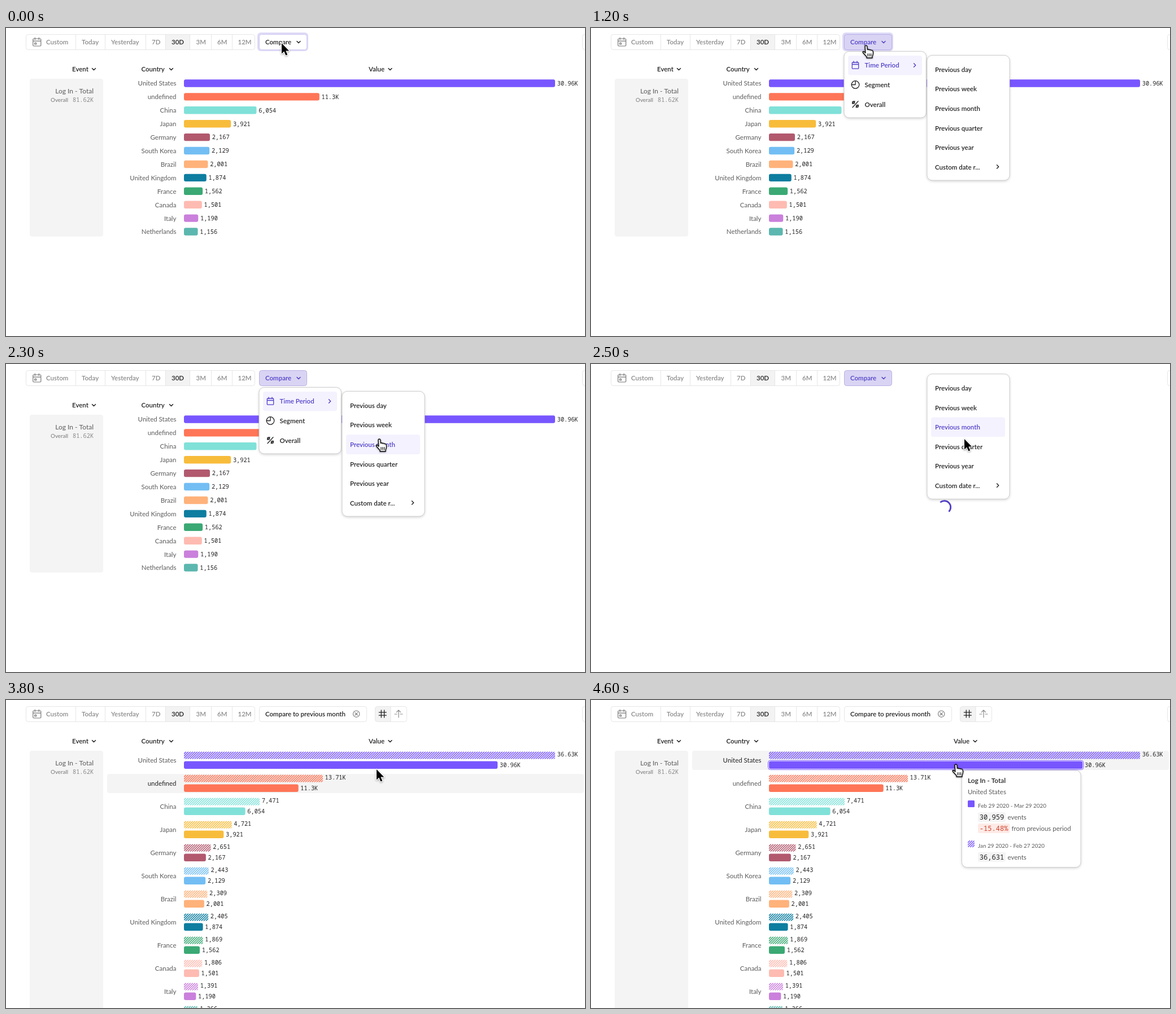
Write an HTML page with a canvas that moves like this. It is 1025 px wide and 546 px high and loops after 4700 ms.

```html
<!DOCTYPE html>
<html lang="en">
<head>
<meta charset="utf-8">
<title>Compare periods</title>
<style>
html, body { margin: 0; width: 100%; height: 100%; overflow: hidden; background: #fff; }
canvas { display: block; width: 1025px; height: 546px; }
</style>
</head>
<body>
<canvas id="stage"></canvas>
<script>
const W = 1025, H = 546, LOOP = 4700, STEP = 100;
const canvas = document.getElementById('stage');
const ctx = canvas.getContext('2d');
const dpr = window.devicePixelRatio || 1;
canvas.width = W * dpr;
canvas.height = H * dpr;

const SANS = 'Lato, "Open Sans", sans-serif';
const MONO = '"Noto Sans Mono", "DejaVu Sans Mono", monospace';
const INK = '#222', SOFT = '#5c5c5c', GREY = '#8a8a8a', LINE = '#e6e6e6';
const PURPLE = '#4f3fc8', TINT = '#f4f2fe', PANEL = '#f4f4f4';
const LEFT = 315, FULL = 657;

// name, colour, current value, previous value
const rows = [
  ['United States', '#7856ff', 30959, 36631],
  ['undefined', '#ff7557', 11300, 13710],
  ['China', '#80e1d9', 6054, 7471],
  ['Japan', '#f8bc3b', 3921, 4721],
  ['Germany', '#b2596e', 2167, 2651],
  ['South Korea', '#72bef4', 2129, 2443],
  ['Brazil', '#ffb27a', 2001, 2309],
  ['United Kingdom', '#0d7ea0', 1874, 2405],
  ['France', '#3ba974', 1562, 1869],
  ['Canada', '#febbb2', 1501, 1806],
  ['Italy', '#ca80dc', 1190, 1391],
  ['Netherlands', '#5bb7af', 1156, 1366]
];
const periods = ['Previous day', 'Previous week', 'Previous month',
  'Previous quarter', 'Previous year', 'Custom date r...'];

// time, x, y of the pointer's hot spot
const track = [
  [0, 488, 27], [600, 488, 27], [800, 487, 31], [1200, 487, 31],
  [1800, 667, 107], [2100, 661, 133], [3700, 661, 133],
  [3800, 656, 123], [4300, 646, 114], [LOOP, 646, 114]
];

const format = v => v >= 1e4 ? +(v / 1000).toFixed(2) + 'K' : v.toLocaleString('en-US');

function text(s, x, y, { color = INK, size = 11.5, weight = 400, align = 'left', face = SANS } = {}) {
  ctx.font = `${weight} ${size}px ${face}`;
  ctx.textAlign = align;
  ctx.fillStyle = color;
  ctx.fillText(s, x, y + size * 0.36);
}
const bold = (s, x, y, color = INK) => text(s, x, y, { color, weight: 600 });
const mono = (s, x, y, color = INK, size = 10.3) => text(s, x, y, { color, size, face: MONO });

function box(x, y, w, h, r, fill, stroke) {
  ctx.beginPath();
  ctx.roundRect(x, y, w, h, r);
  if (fill) { ctx.fillStyle = fill; ctx.fill(); }
  if (stroke) { ctx.strokeStyle = stroke; ctx.lineWidth = 1; ctx.stroke(); }
}

function path(d, x, y, stroke, width = 1.3, fill) {
  const p = new Path2D(d);
  ctx.save();
  ctx.translate(x, y);
  ctx.lineJoin = ctx.lineCap = 'round';
  if (fill) { ctx.fillStyle = fill; ctx.fill(p); }
  if (stroke) { ctx.strokeStyle = stroke; ctx.lineWidth = width; ctx.stroke(p); }
  ctx.restore();
}

function circle(x, y, r, color, width = 1.3) {
  ctx.beginPath();
  ctx.arc(x, y, r, 0, 7);
  ctx.strokeStyle = color;
  ctx.lineWidth = width;
  ctx.stroke();
}

const chevron = (x, y, color = INK) => path('M-3 -1.5L0 1.5L3 -1.5', x, y, color, 1.5);
const arrowRight = (x, y, color) => path('M-1.5 -3.2L1.7 0L-1.5 3.2', x, y, color, 1.4);

function card(x, y, w, h) {
  ctx.save();
  ctx.shadowColor = 'rgba(0,0,0,.2)';
  ctx.shadowBlur = 5 * dpr;
  ctx.shadowOffsetY = 1.5 * dpr;
  box(x, y, w, h, 9, '#fff');
  ctx.restore();
  box(x, y, w, h, 9, null, '#cfcfcf');
}

function hatch(x, y, w, h, color, r = 3) {
  ctx.save();
  ctx.beginPath();
  ctx.roundRect(x, y, w, h, r);
  ctx.clip();
  ctx.beginPath();
  for (let k = x - h; k < x + w + h; k += 4) {
    ctx.moveTo(k, y + h);
    ctx.lineTo(k + h, y);
  }
  ctx.strokeStyle = color;
  ctx.lineWidth = 1.5;
  ctx.stroke();
  ctx.restore();
}

function toolbar(t) {
  box(283, 12, 42, 26, 0, '#f3f3f3');
  box(35.5, 11.5, 405, 27, 4, null, LINE);
  for (const x of [123, 175, 247, 282, 325, 363, 400]) {
    ctx.fillStyle = LINE;
    ctx.fillRect(x, 12, 1, 26);
  }
  path('M-5.5 -6H5.5Q7 -6 7 -4.5V5.5Q7 7 5.5 7H-5.5Q-7 7 -7 5.5V-4.5Q-7 -6 -5.5 -6ZM-7 -1.8H7M-3.5 -8V-4.5M3.5 -8V-4.5M-4 1.3H-1.2V4H-4Z',
    54.8, 25, '#777', 1.2);
  const items = [['Custom', 71], ['Today', 134], ['Yesterday', 186], ['7D', 258],
    ['30D', 293], ['3M', 336.5], ['6M', 374], ['12M', 410.5]];
  for (const [s, x] of items) bold(s, x, 25, s === '30D' ? INK : GREY);
  box(1020.5, 11.5, 30, 27, 4, null, LINE);

  if (t >= 2800) {
    box(448.5, 11.5, 190, 27, 4, '#fff', LINE);
    bold('Compare to previous month', 459, 25);
    circle(620.2, 24.7, 5.7, '#777', 1.1);
    path('M-2.3 -2.3L2.3 2.3M2.3 -2.3L-2.3 2.3', 620.2, 24.7, '#777', 1.1);
    box(653, 12, 28, 26, [4, 0, 0, 4], '#f3f3f3');
    box(653.5, 11.5, 56, 27, 4, null, LINE);
    ctx.fillStyle = LINE;
    ctx.fillRect(680.5, 12, 1, 26);
    path('M-2.5 -6.5V6.5M2.8 -6.5V6.5M-6.5 -2.7H6.5M-6.5 2.7H6.5', 666.8, 24.5, INK, 1.3);
    path('M0 6.5V-6M-3.6 -2.8L0 -6.5L3.6 -2.8M-7 0.5H-3M3 0.5H7', 695, 24.5, GREY, 1.2);
    return;
  }
  const open = t >= 700;
  if (t < 2300) box(445, 8, 90, 33, 6, '#ddd9f7');
  box(448.5, 11.5, 84, 27, 4, open ? '#d9d4f3' : '#fff', open ? '#b9b0e6' : '#d2ccf3');
  bold('Compare', 459, 25, open ? PURPLE : INK);
  chevron(518, 25, open ? PURPLE : INK);
}

function chart(compare, hover, active) {
  for (const [s, x, c] of [['Event', 117, 155.5], ['Country', 239.5, 292.5], ['Value', 642, 680]]) {
    bold(s, x, 73.3);
    chevron(c, 73, INK);
  }
  box(42, 90, 130, compare ? 480 : 279.5, 4, PANEL);
  text('Log In - Total', 155, 112, { color: SOFT, size: 12, align: 'right' });
  text('Overall', 79, 127, { color: '#777', size: 9.9 });
  mono('81.62K', 118, 127, GREY);

  const pitch = compare ? 41 : 23.91;
  const scale = FULL / (compare ? rows[0][3] : rows[0][2]);
  rows.forEach(([name, color, now, before], i) => {
    const y = (compare ? 107 : 98) + i * pitch;
    const w = now * scale;
    if (i === hover) box(179, y - 17, 844, 34, 4, PANEL);
    text(name, 301.5, y + 0.3, { color: i === hover ? INK : SOFT, align: 'right' });
    const mid = compare ? y + 8.3 : y;
    if (compare) {
      const pw = before * scale;
      hatch(LEFT, y - 15.6, pw, 13.4, color);
      mono(format(before), LEFT + pw + 3.7, y - 10.7);
    }
    if (i === 0 && active) box(LEFT - 1.5, mid - 8.2, w + 3, 16.4, 4, '#fff', color);
    box(LEFT, mid - 6.7, w, 13.4, 3, color);
    mono(format(now), LEFT + w + 3.7, mid + 0.1);
  });
}

function mainMenu() {
  card(448, 41.5, 145.5, 117.5);
  box(455, 49, 131, 34.5, 4, TINT);
  path('M-4.5 -5H4.5Q5.7 -5 5.7 -3.8V5Q5.7 6.2 4.5 6.2H-4.5Q-5.7 6.2 -5.7 5V-3.8Q-5.7 -5 -4.5 -5ZM-5.7 -1.5H5.7M-3 -7V-4.5M3 -7V-4.5',
    468, 66, PURPLE);
  bold('Time Period', 484.5, 66.3, PURPLE);
  arrowRight(573, 66, PURPLE);
  circle(468, 100.5, 6.8, INK);
  path('M0 -6.8V0H-6.8', 468, 100.5, INK);
  bold('Segment', 484.5, 101);
  path('M5 -5.5L-5 5.5M-5.5 -1.2L-1 -5.5M1.2 5.5L5.5 1.2', 468, 135.2, INK);
  circle(464.7, 132, 2, INK);
  circle(471.4, 138.5, 2, INK);
  bold('Overall', 484.5, 135.7);
}

function periodMenu(top, picked) {
  card(595, top, 146, 221.5);
  periods.forEach((s, i) => {
    const y = top + 24.9 + i * 34.6;
    if (i === picked) box(602, y - 17.3, 131, 34.6, 4, TINT);
    bold(s, 609, y + 0.2, i === picked ? PURPLE : INK);
    if (i === 5) arrowRight(720, y - 0.5, INK);
  });
}

function spinner(t) {
  const a = (230 + (t - 2500) * 0.5) * Math.PI / 180;
  ctx.beginPath();
  ctx.arc(625.5, 253.8, 11.2, a, a + 3.05);
  ctx.strokeStyle = PURPLE;
  ctx.lineWidth = 2.8;
  ctx.lineCap = 'butt';
  ctx.stroke();
}

function tooltip() {
  card(656.5, 124.5, 210.5, 172);
  text('Log In - Total', 667, 143, { weight: 600, size: 11.8 });
  text('United States', 667, 163.3, { color: SOFT });
  box(667, 178, 12, 12, 1.5, rows[0][1]);
  hatch(667, 249, 12, 12, rows[0][1], 1.5);
  const note = { color: SOFT, size: 9.9 };
  text('Feb 29 2020 - Mar 29 2020', 685, 187.8, note);
  text('Jan 29 2020 - Feb 27 2020', 685, 258.2, note);
  for (const [s, y] of [['30,959', 207.7], ['36,631', 278.2]]) {
    box(685, y - 8.5, 49, 17, 3, PANEL);
    mono(s, 687.8, y, INK, 12.1);
    text('events', 737.5, y + 0.2, { color: SOFT });
  }
  box(685, 219, 56.5, 17, 3, '#fdeae6');
  mono('-15.48%', 687.8, 227.5, '#d0402b', 12.1);
  text('from previous period', 744.5, 227.7, { color: SOFT });
}

function pointer(t) {
  const i = track.findIndex(k => k[0] > t);
  const [a, b] = [track[i - 1], track[i]];
  const u = (t - a[0]) / (b[0] - a[0]);
  const e = u * u * (3 - 2 * u);
  return [a[1] + (b[1] - a[1]) * e, a[2] + (b[2] - a[2]) * e];
}

function cursor(x, y, hand) {
  ctx.save();
  ctx.shadowColor = 'rgba(0,0,0,.3)';
  ctx.shadowBlur = 3 * dpr;
  ctx.shadowOffsetY = dpr;
  if (hand) {
    path('M-2 2Q-2 0 0 0Q1.8 0 2 2L2.3 7.2Q4.4 6 5.7 7.8Q7.6 6.8 8.9 8.6Q11.2 7.8 12.2 10.2Q13.2 13 12.2 16L11 19.5V22H1V20L-5.3 13Q-6.6 11 -4.8 10.5Q-3.3 10.4 -1.2 13Z',
      x, y, '#000', 1.3, '#fff');
    ctx.shadowColor = 'transparent';
    path('M3 14.5V19M5.8 14.5V19M8.6 14.5V19', x, y, '#000', 1.1);
  } else {
    const d = 'M0 0V18.5L4.3 14.5L7.3 21.6L10.3 20.3L7.3 13.4H13.2Z';
    path(d, x, y, '#fff', 2.6, '#fff');
    ctx.shadowColor = 'transparent';
    path(d, x, y, null, 0, '#000');
  }
  ctx.restore();
}

function draw(t) {
  ctx.setTransform(dpr, 0, 0, dpr, 0, 0);
  ctx.fillStyle = '#fff';
  ctx.fillRect(0, 0, W, H);
  const [x, y] = pointer(t);
  const loading = t >= 2400 && t < 3200;

  toolbar(t);
  if (t < 2400) chart(false, -1, false);
  else if (loading) spinner(t);
  else chart(true, t < 3300 ? -1 : t < 4000 ? 1 : 0, t >= 4200);

  if (t >= 800 && t < 2400) mainMenu();
  if (t >= 1000 && t < 2400) {
    periodMenu(48.5, x > 602 ? Math.floor((y - 56) / 34.6) : -1);
  } else if (t >= 2400 && t < 2700) {
    periodMenu(17.8, 2);
  }
  if (t >= 4400) tooltip();
  cursor(x, y, (t >= 600 && t < 2400) || t >= 4200);
}

let start;
function tick(now) {
  start ??= now;
  draw(Math.floor((now - start) % LOOP / STEP) * STEP);
  requestAnimationFrame(tick);
}
requestAnimationFrame(tick);
</script>
</body>
</html>
```
